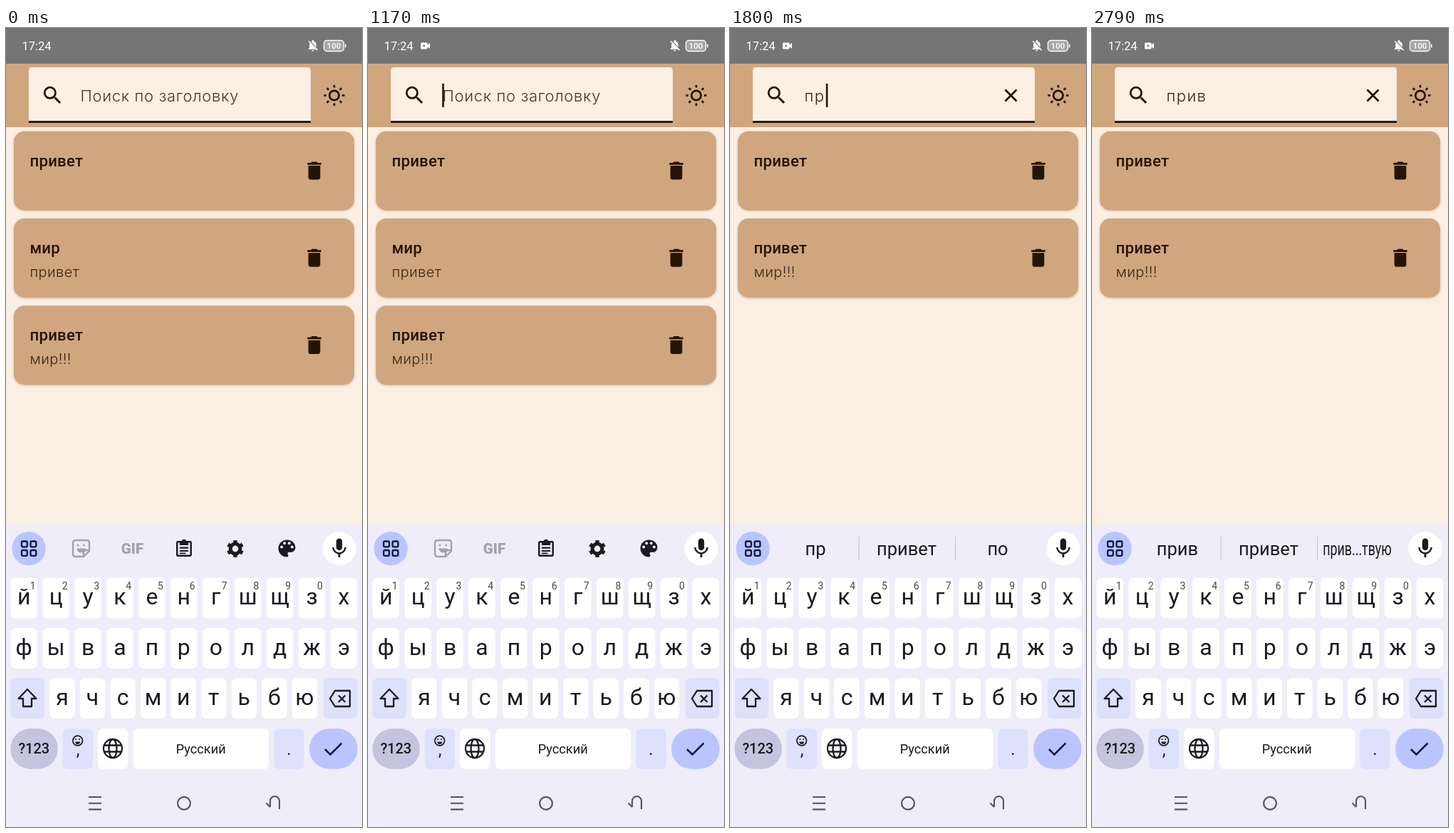
Write an HTML page that moves like this. It is 500 by 1120 pixels and loops after 2.97 s.

```html
<!DOCTYPE html>
<html lang="ru">
<head>
<meta charset="utf-8">
<style>
  html, body { margin: 0; width: 100%; height: 100%; overflow: hidden; background: #fbeee2; }
  svg { display: block; width: 100%; height: 100%; font-family: Roboto, sans-serif; }
  .wide { font-family: Inter, sans-serif; font-weight: 300; }
  .card rect { filter: drop-shadow(0 1.5px 1.5px rgba(60, 30, 0, .28)); }
  .line { fill: none; stroke: currentColor; }
</style>
</head>
<body>
<svg id="stage" viewBox="0 0 500 1120"></svg>
<script>
const LOOP = 2970, CARD_STEP = 122.3;
const BROWN = '#251303', INK = '#1a1a21', NAVY = '#10163f', LILAC = '#efedf9', PALE = '#dde1fb', BLUE = '#bac5ff';
const stage = document.getElementById('stage');
const $ = id => document.getElementById(id);

const rect = (x, y, w, h, fill, r = 0, extra = '') =>
  `<rect x="${x}" y="${y}" width="${w}" height="${h}" rx="${r}" fill="${fill}" ${extra}/>`;
const circle = (x, y, r, fill, extra = '') => `<circle cx="${x}" cy="${y}" r="${r}" fill="${fill}" ${extra}/>`;
const text = (x, y, size, str, fill = INK, extra = '') =>
  `<text x="${x}" y="${y}" font-size="${size}" fill="${fill}" ${extra}>${str}</text>`;
const mid = (x, y, size, str, fill = INK, extra = '') => text(x, y, size, str, fill, 'text-anchor="middle" ' + extra);
const line = (d, color, width, extra = '') =>
  `<path class="line" d="${d}" color="${color}" stroke-width="${width}" ${extra}/>`;
// 24-unit icon centred on x, y
const icon = (x, y, d, fill, scale = 1.39, more = '') =>
  `<g transform="translate(${x} ${y}) scale(${scale}) translate(-12 -12)" fill="${fill}"><path d="${d}"/>${more}</g>`;

const ICONS = {
  search: 'M15.5 14h-.79l-.28-.27A6.47 6.47 0 0 0 16 9.5 6.5 6.5 0 1 0 9.5 16c1.61 0 3.09-.59 4.23-1.57l.27.28v.79l5 4.99L20.49 19zm-6 0a4.5 4.5 0 1 1 0-9 4.5 4.5 0 0 1 0 9z',
  trash: 'M6 19c0 1.1.9 2 2 2h8c1.1 0 2-.9 2-2V7H6zM19 4h-3.5l-1-1h-5l-1 1H5v2h14z',
  mic: 'M12 14c1.66 0 3-1.34 3-3V5a3 3 0 0 0-6 0v6c0 1.66 1.34 3 3 3zM17.3 11c0 3-2.54 5.1-5.3 5.1S6.7 14 6.7 11H5c0 3.41 2.72 6.23 6 6.72V21h2v-3.28c3.28-.49 6-3.31 6-6.72z',
  palette: 'M12 3a9 9 0 0 0 0 18c.83 0 1.5-.67 1.5-1.5 0-.39-.15-.74-.39-1.01-.23-.26-.38-.61-.38-.99 0-.83.67-1.5 1.5-1.5H16c2.76 0 5-2.24 5-5 0-4.42-4.03-8-9-8z',
  clipboard: 'M19 3h-4.2a3 3 0 0 0-5.6 0H5a2 2 0 0 0-2 2v14c0 1.1.9 2 2 2h14a2 2 0 0 0 2-2V5a2 2 0 0 0-2-2zm0 16H5V5h2v3h10V5h2zM7 10h10v1.8H7zM7 13.6h10v1.6H7zM7 16.6h7v1.4H7z',
  bellOff: 'M20 18.69 7.84 6.14 5.27 3.49 4 4.76l2.8 2.8c-.52 1-.8 2.17-.8 3.43v5l-2 2v1h13.73l2 2L21 19.72zM12 22a2 2 0 0 0 2-2h-4a2 2 0 0 0 2 2zm6-7.32V11c0-3.08-1.64-5.64-4.5-6.32V4a1.5 1.5 0 0 0-3 0v.68c-.5.12-1 .3-1.44.55z'
};

function statusBar() {
  return rect(0, 0, 500, 50, '#757575') +
    text(22.5, 31, 16.5, '17:24', '#fff') +
    `<g id="camera">${rect(74, 20.5, 9.5, 9, '#fff', 1.5)}<path d="M83 24l4-3v8l-4-3z" fill="#fff"/>${circle(78.7, 25, 1.5, '#757575')}</g>` +
    icon(431, 24.5, ICONS.bellOff, '#fff', .8) +
    rect(446.5, 17.5, 28, 15, '#a6a6a6', 4, 'stroke="#fff" stroke-width="1.3"') +
    mid(460.5, 29.3, 11.5, '100', '#fff', 'font-weight="500"') + rect(476, 22.5, 1.6, 5, '#fff', .8);
}

function header() {
  let rays = '';
  for (let a = 0; a < 360; a += 45) rays += line('M0-11v-3.6', BROWN, 2.7, `transform="rotate(${a})"`);
  return rect(0, 50, 500, 89, '#d0a67e') +
    `<path d="M32 133V60q0-5 5-5h386q5 0 5 5v73z" fill="#fcefe3"/>` + rect(32, 130.2, 396, 2.8, '#1e1107') +
    icon(65.3, 94.3, ICONS.search, BROWN) +
    text(104.5, 102.5, 22, 'Поиск по заголовку', '#4a3423', 'id="hint" class="wide" letter-spacing=".67"') +
    text(104.5, 102.5, 22, '', '#3a2414', 'id="query" class="wide" letter-spacing="1.4"') +
    rect(0, 78, 2.6, 33, BROWN, 0, 'id="caret"') +
    line('M386.5 86.5l16 16m0-16l-16 16', BROWN, 2.7, 'id="clear"') +
    `<g transform="translate(461 94.5)">${circle(0, 0, 6.7, 'none', `stroke="${BROWN}" stroke-width="2.7"`)}${rays}</g>`;
}

const card = (title, body, i) =>
  `<g class="card" id="card${i}" transform="translate(0 ${144.7 + i * CARD_STEP})">` +
  rect(11, 0, 478, 110.7, '#d0a67e', 15) +
  text(33.5, 49, 22.2, title, BROWN, 'font-weight="500" letter-spacing=".2"') +
  text(33.5, 82, 20, body, '#3a2414', 'class="wide" letter-spacing=".4"') +
  icon(433, 55.3, ICONS.trash, BROWN) + '</g>';

function toolbar() {
  const gray = '#a3a2ab';
  const sticker = line('M98 718h15q4 0 4 4v11l-8 8H98q-4 0-4-4v-15q0-4 4-4zM117 732h-4q-4 0-4 4v5', gray, 2.4) +
    circle(101, 725, 1.5, gray) + circle(109.5, 725, 1.5, gray) + `<path d="M99 729.5h13q-2 6-6.500 6t-6.500-6z" fill="${gray}"/>`;
  const gear = circle(322, 730, 6.9, 'none', `stroke="${INK}" stroke-width="5"`) +
    circle(322, 730, 10.2, 'none', `stroke="${INK}" stroke-width="3.6" pathLength="12" stroke-dasharray="1" stroke-dashoffset="-.5"`);
  const dabs = [[6.5, 10.5], [9.5, 6.5], [14.5, 6.5], [17.5, 10.5]].map(([x, y]) => circle(x, y, 1.5, LILAC)).join('');
  return `<g id="toolbar">${sticker}` +
    mid(177.5, 737, 20.5, 'GIF', gray, 'font-weight="800"') +
    icon(250, 730, ICONS.clipboard, INK, 1.22) + gear +
    icon(394.5, 729.5, ICONS.palette, INK, 1.33, dabs) + '</g>';
}

function suggestions() {
  return '<g id="suggestions">' + rect(180.5, 713, 1.2, 33, '#c6c5cf') + rect(316, 713, 1.2, 33, '#c6c5cf') +
    mid(120, 739, 25.5, '', INK, 'id="typed"') + mid(248, 739, 25.5, 'привет') +
    mid(0, 739, 25.5, '', INK, 'id="guess"') + '</g>';
}

function keyboard() {
  const grid = [22, 34.5].flatMap(x => [719.5, 732].map(y =>
    rect(x, y, 7.8, 7.8, 'none', 1.8, `stroke="${NAVY}" stroke-width="2.3"`))).join('');
  const key = (x, y, w, fill = '#fff', r = 7) => rect(x, y, w, 56.7, fill, r);
  const row = (letters, y, x0, step, w) => [...letters].map((c, i) =>
    key(x0 + i * step - w / 2, y, w) + mid(x0 + i * step, y + 37.5, 32, c)).join('');
  const digits = [...'1234567890'].map((d, i) => mid(37.8 + i * 44.8, 787, 14, d, '#45454d')).join('');
  return rect(0, 696, 500, 2.5, '#f4ebe6') + rect(0, 698, 500, 422, LILAC) +
    circle(32, 729.7, 23.7, BLUE) + grid +
    circle(468, 729.7, 23.7, '#fff') + icon(468, 729.5, ICONS.mic, INK) +
    row('йцукенгшщзх', 770.8, 25.2, 44.93, 37.7) + digits +
    row('фывапролджэ', 841, 25.2, 44.93, 37.7) +
    row('ясмитьбю'.replace('я', 'яч'), 911.3, 79, 42.55, 35.6) +
    key(6.5, 911.3, 47.5, PALE) + line('M30 927l12.500 13H36v11H24V940h-6.500z', INK, 2.3, 'stroke-linejoin="round"') +
    key(445.7, 911.3, 47.7, PALE) +
    line('M455 940l7-11h21v22h-21zM467 935.500l9.500 9.500m0-9.500l-9.500 9.500', INK, 2.3, 'stroke-linejoin="round"') +
    key(6.2, 982, 66.7, '#c5c4de', 28.3) + mid(39.3, 1017.3, 20, '?123', INK, 'font-weight="500"') +
    key(79.8, 982, 42.4, PALE) + circle(100.7, 999, 6.8, 'none', `stroke="${INK}" stroke-width="1.7"`) +
    circle(98.3, 997, 1.1, INK) + circle(103.1, 997, 1.1, INK) +
    `<path d="M97 1000.500h7.400q-1 3.500-3.700 3.500t-3.700-3.500z" fill="${INK}"/>` + mid(101, 1019.5, 24, ',') +
    key(129, 982, 42.5) +
    line('M137 1010a13 13 0 1 0 26 0 13 13 0 1 0-26 0M144.500 1010a5.500 13 0 1 0 11 0 5.500 13 0 1 0-11 0M138 1005.500h24M138 1014.500h24', INK, 2.3) +
    key(178.7, 982, 190.6) + mid(273.7, 1017, 18.2, 'Русский') +
    key(376.3, 982, 42.4, PALE) + mid(397.3, 1019, 24, '.') +
    key(426, 982, 67.8, BLUE, 28.3) + line('M448 1011l7.500 7.500 16-16', NAVY, 2.5) +
    line('M116 1078h18M116 1086.700h18M116 1095.400h18', '#55545c', 2.1) +
    circle(250, 1086.7, 8.9, 'none', 'stroke="#55545c" stroke-width="2.2"') +
    line('M384 1095v-11.500a6.500 6.500 0 0 0-13 0V1092M365.500 1086.500l5.500 5.500', '#55545c', 2.1);
}

stage.innerHTML = statusBar() + header() +
  [['привет', ''], ['мир', 'привет'], ['привет', 'мир!!!']].map(([t, b], i) => card(t, b, i)).join('') +
  keyboard() + toolbar() + suggestions();

const show = (id, on) => $(id).setAttribute('visibility', on ? 'visible' : 'hidden');
const WORD = 'прив', KEY_TIMES = [1440, 1710, 1980, 2250];
// third suggestion per typed length: word, centre, condensing
const GUESSES = [['', 376, 1], ['по', 376, 1], ['по', 376, 1], ['пришлите', 376, .86], ['прив...твую', 372.5, .7]];

function render(t) {
  const typed = KEY_TIMES.filter(k => t >= k).length;
  const shown = t < 1530 ? 0 : typed;
  const [guess, x, squeeze] = GUESSES[typed];

  $('camera').setAttribute('opacity', Math.max(0, Math.min(1, (t - 440) / 270)));
  show('hint', !shown);
  show('clear', shown);
  $('query').textContent = WORD.slice(0, shown);
  $('caret').setAttribute('x', 104.2 + 15.3 * shown);
  show('caret', (t >= 90 && t < 630) || (t >= 1080 && t < 2700));

  show('card1', !shown);
  $('card2').setAttribute('transform', `translate(0 ${144.7 + (shown ? 1 : 2) * CARD_STEP})`);

  show('toolbar', !typed);
  show('suggestions', typed);
  $('typed').textContent = WORD.slice(0, typed);
  $('guess').textContent = guess;
  $('guess').setAttribute('transform', `translate(${x} 0) scale(${squeeze} 1)`);
}

const start = performance.now();
(function tick() {
  render((performance.now() - start) % LOOP);
  requestAnimationFrame(tick);
})();
</script>
</body>
</html>
```
